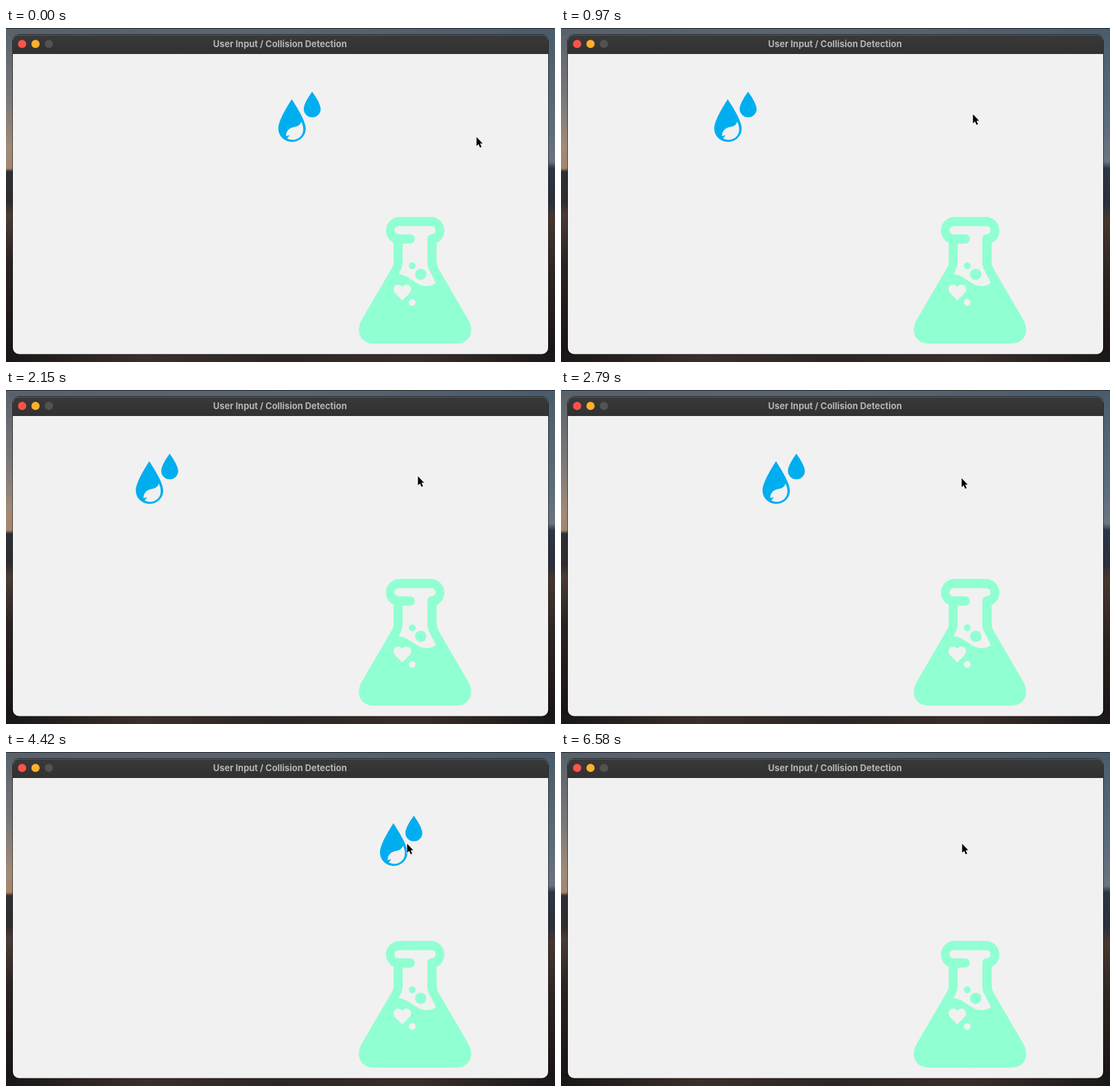
An HTML page that plays this animation: 800x488 px, repeating every 6.61 s.

```html
<!DOCTYPE html>
<html lang="en">
<head>
<meta charset="utf-8">
<title>User Input / Collision Detection</title>
<style>
  html, body { margin: 0; width: 100%; height: 100%; overflow: hidden; background: #222; }
  svg { display: block; width: 100vw; height: 100vh; }
  text { font: 700 12.9px Inter, "Open Sans", sans-serif; }
</style>
</head>
<body>
<svg viewBox="0 0 800 488">
  <defs>
    <linearGradient id="skyLeft" x2="0" y2="1">
      <stop offset="0" stop-color="#59616a"/>
      <stop offset=".2" stop-color="#77777a"/>
      <stop offset=".36" stop-color="#a08a78"/>
      <stop offset=".42" stop-color="#a5866c"/>
      <stop offset=".43" stop-color="#2e2f36"/>
      <stop offset=".52" stop-color="#302c2e"/>
      <stop offset=".56" stop-color="#4a3c35"/>
      <stop offset=".7" stop-color="#2b2422"/>
      <stop offset="1" stop-color="#171413"/>
    </linearGradient>
    <linearGradient id="skyRight" x2="0" y2="1">
      <stop offset="0" stop-color="#4a5c6c"/>
      <stop offset=".3" stop-color="#5d6d7c"/>
      <stop offset=".4" stop-color="#6d7480"/>
      <stop offset=".42" stop-color="#2c3646"/>
      <stop offset=".52" stop-color="#2b303b"/>
      <stop offset=".57" stop-color="#45372f"/>
      <stop offset=".75" stop-color="#2c2422"/>
      <stop offset="1" stop-color="#171413"/>
    </linearGradient>
    <linearGradient id="skyTop">
      <stop offset="0" stop-color="#59616a"/>
      <stop offset=".5" stop-color="#5b646e"/>
      <stop offset="1" stop-color="#4a5c6c"/>
    </linearGradient>
    <linearGradient id="ground">
      <stop offset="0" stop-color="#1a1716"/>
      <stop offset=".25" stop-color="#3a2f2a"/>
      <stop offset=".5" stop-color="#2c2624"/>
      <stop offset=".75" stop-color="#392e29"/>
      <stop offset="1" stop-color="#1b1817"/>
    </linearGradient>
    <linearGradient id="bar" x2="0" y2="1">
      <stop offset="0" stop-color="#393939"/>
      <stop offset="1" stop-color="#313131"/>
    </linearGradient>
    <clipPath id="frame"><rect x="10" y="10" width="780" height="466.5" rx="9"/></clipPath>
  </defs>

  <!-- desktop -->
  <rect width="400" height="488" fill="url(#skyLeft)"/>
  <rect x="400" width="400" height="488" fill="url(#skyRight)"/>
  <rect width="800" height="11" fill="url(#skyTop)"/>
  <rect y="475" width="800" height="13" fill="url(#ground)"/>
  <rect width="800" height="1" fill="#22272c"/>

  <!-- window -->
  <rect x="9.5" y="9.5" width="781" height="467.5" rx="9.5" fill="none" stroke="#000" stroke-opacity=".55"/>
  <g clip-path="url(#frame)">
    <rect x="10" y="10" width="780" height="467" fill="#f1f1f1"/>
    <rect x="10" y="10" width="780" height="28" fill="url(#bar)"/>
    <rect x="10" y="10" width="780" height="1" fill="#5a5a5a"/>
  </g>
  <circle cx="23.5" cy="23.3" r="6" fill="#ff5249"/>
  <circle cx="43" cy="23.3" r="6" fill="#fdb02b"/>
  <circle cx="62.5" cy="23.3" r="6" fill="#525252"/>
  <text x="399.3" y="27.5" text-anchor="middle" fill="#b5b5b5">User Input / Collision Detection</text>

  <!-- flask -->
  <g fill="#90ffd2">
    <path fill-rule="evenodd" d="
      M573 276H619A20 20 0 0 1 627.5 314V341Q627.5 347 631 353L674 427C684 446 673 461 657 461H535
      C519 461 508 446 518 427L561 353Q565 347 565 341V314A20 20 0 0 1 573 276Z
      M572 289.5H620A6 6 0 0 1 620 301.5Q614 302 614 308V342Q614 349 618 356L626.5 372.5
      C620 378 612 378 604 375.5C593 371 586 361 572 359.5Q578 350 578 341V315H589
      A6.75 6.75 0 0 0 589 301.5H572A6 6 0 0 1 572 289.5Z
      M577.5 398L567 387.5C562 381.5 566 375 571 375C575 375 577 377 577.5 379
      C578 377 580 375 584 375C589 375 593 381.5 588 387.5Z
      M587 401a5 5 0 1 0 10 0a5 5 0 1 0 -10 0Z"/>
    <circle cx="592" cy="347.5" r="5"/>
    <circle cx="604.3" cy="360" r="8.3"/>
  </g>

  <g id="drops" fill="#00aeef">
    <path transform="translate(-428 -129.8)" fill-rule="evenodd" d="
      M416.7 104C420 110 437 134 437 147A20 19.5 0 0 1 397 147C397 134 413 110 416.7 104Z
      M430.5 136.5C428 146 419 143 413 147.5C409 151 408 155 408.3 158L413.5 156.5L410 161.3
      C415 164.5 422 164 427 160.5C435 155 434.5 145 430.5 136.5Z
      M446.3 93C448.7 96.5 458.7 110 458.7 118.5A12.3 12 0 0 1 434.1 118.5C434.1 110 444 96.5 446.3 93Z"/>
  </g>

  <path id="pointer" d="M0 0V13.2L3 10.4L5.2 15.4L7.4 14.4L5.2 9.5H9Z"
        stroke="#fff" stroke-width="1.6" paint-order="stroke" stroke-linejoin="round"/>
</svg>
<script>
const LOOP = 6610, FALL_START = 4860, FALL_TIME = 1735;
const START_Y = 129.8, FALL_HEIGHT = 336;

// Keys are [time, ...values].
const dropKeys = [[0, 428], [970, 254.5], [1160, 220], [2150, 220], [3420, 427.3],
                  [4420, 575.8], [4540, 593.2], [5270, 593.2], [6580, 594.5]];
const pointerKeys = [[0, 685.7, 159.3], [970, 600.3, 126], [2150, 600.3, 126],
                     [3420, 567.5, 131.5], [4420, 584.5, 134]];

function sample(keys, time) {
  const next = keys.findIndex(key => key[0] > time);
  if (next < 0) return keys[keys.length - 1].slice(1);
  const a = keys[next - 1], b = keys[next];
  const mix = (time - a[0]) / (b[0] - a[0]);
  return a.slice(1).map((value, i) => value + (b[i + 1] - value) * mix);
}

const drops = document.getElementById("drops");
const pointer = document.getElementById("pointer");

function draw(time) {
  const [x] = sample(dropKeys, time);
  const fall = Math.min(1, Math.max(0, (time - FALL_START) / FALL_TIME));
  const y = START_Y + FALL_HEIGHT * fall;
  drops.setAttribute("transform", `translate(${x} ${y}) scale(${1 - fall * fall})`);
  pointer.setAttribute("transform", `translate(${sample(pointerKeys, time).join(" ")})`);
}

const start = performance.now();
function tick() {
  draw((performance.now() - start) % LOOP);
  requestAnimationFrame(tick);
}
tick();
</script>
</body>
</html>
```
